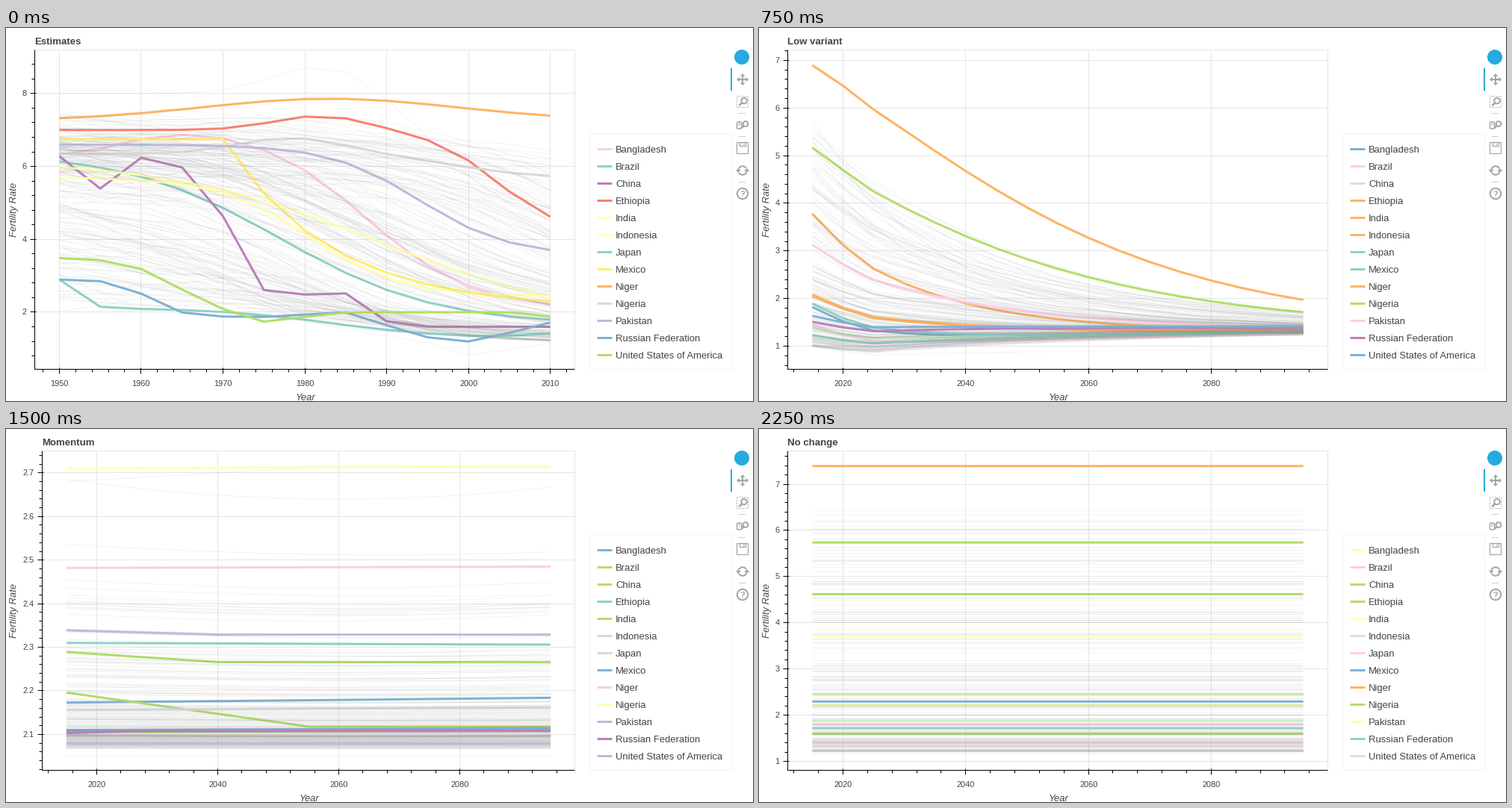
Write a matplotlib script that moves like this. It is 1000 by 500 pixels and loops after 2500 ms.

```python
import numpy as np
import matplotlib.pyplot as plt
from matplotlib.animation import FuncAnimation
from matplotlib.patches import Arc, Circle, FancyBboxPatch, Polygon, Rectangle

PX = 0.72  # points per pixel at 100 dpi
RIGHT, TOP, BOTTOM = 761, 29, 457
INK, GRID, ICON, ACTIVE = "#444444", "#e5e5e5", "#a1a6a9", "#26aae1"
PAST = np.arange(1950, 2011, 5)
FUTURE = np.arange(2015, 2096, 5)
AGE = FUTURE - 2015

PALETTE = dict(t="#8dd3c7", y="#ffffb3", l="#bebada", r="#fb8072",
               b="#80b1d3", o="#fdb462", g="#b3de69", p="#fccde5",
               s="#d9d9d9", v="#bc80bd", m="#ccebc5", d="#ffed6f")

# lowest and highest value per data set; the axes add 5 % on both sides
EXTENT = dict(past=(0.832, 8.797), medium=(1.235, 7.161), high=(1.485, 7.411),
              low=(0.819, 6.914), fixed=(1.12, 7.405),
              instant=(2.0357, 2.6172), momentum=(2.051, 2.717))

# title, data set, one palette letter per country
SCENES = [
    ("Estimates", "past", "ptvryytdoslbg"),
    ("Medium variant", "medium", "lvblmytbydpmm"),
    ("High variant", "high", "gtobpldytrbsm"),
    ("Low variant", "low", "bpmooottogpvb"),
    ("Constant-fertility", "fixed", "tlbpgyosrbmvd"),
    ("Instant-replacement", "instant", "ydbrlmglpytov"),
    ("Momentum", "momentum", "bggtgssbpylvl"),
    ("Zero-migration", "medium", "psgbpdmbgmsrp"),
    ("Constant-mortality", "medium", "mbytpoglvbdsr"),
    ("No change", "fixed", "ypggympbogytm"),
]


def fall(high, low, mid, width):
    """Logistic drop from one level to another."""
    return low + (high - low) / (1 + np.exp((PAST - mid) / width))


def decay(high, low, since, tau):
    return low + (high - low) * np.exp(-np.maximum(PAST - since, 0) / tau)


def bump(size, year, width):
    return size * np.exp(-((PAST - year) / width) ** 2)


def settle(start, floor, tau):
    """Decay towards a floor; floors under 1.8 slowly recover to it."""
    goal = floor + np.maximum(1.8 - floor, 0) * AGE / 80
    shape = 1 + 0.105 * np.maximum(start - 4, 0)
    return goal + (start - goal) * np.exp(-(AGE / tau) ** shape)


def drift(start, end, until=2095):
    return np.interp(FUTURE, [2015, until], [start, end])


def variants(past, medium, instant, momentum):
    shift = 0.25 + 0.25 * np.minimum(AGE / 10, 1) ** 0.75
    return dict(past=past, medium=medium, high=medium + shift,
                low=medium - shift, instant=instant, momentum=momentum,
                fixed=np.full(len(FUTURE), past[-1]))


COUNTRIES = {
    "Bangladesh": variants(
        fall(7.1, 2.07, 1987.5, 6.5) + bump(-0.75, 1950, 10),
        settle(2.07, 1.62, 12), settle(2.144, 2.075, 25), drift(2.173, 2.184)),
    "Brazil": variants(
        fall(6.4, 1.65, 1977, 9.5),
        settle(1.70, 1.50, 12), settle(2.098, 2.06, 50), drift(2.105, 2.11)),
    "China": variants(
        fall(6.3, 1.6, 1971.5, 2.5) + bump(1.05, 1983, 5) + bump(-0.9, 1955, 2.5),
        settle(1.64, 1.68, 15), settle(2.19, 2.06, 40), drift(2.196, 2.118, 2055)),
    "Ethiopia": variants(
        fall(7.0, 4.15, 2003.5, 4) + bump(0.4, 1982, 8),
        settle(4.03, 1.76, 19.5), settle(2.25, 2.07, 18), drift(2.31, 2.306)),
    "India": variants(
        fall(6.2, 1.68, 1989, 13),
        settle(2.30, 1.77, 20), settle(2.259, 2.095, 25), drift(2.289, 2.266, 2040)),
    "Indonesia": variants(
        fall(5.7, 2.44, 1980.5, 5.5),
        settle(2.33, 1.82, 18), settle(2.141, 2.075, 30), drift(2.156, 2.162)),
    "Japan": variants(
        fall(2.12, 1.29, 1983, 7) + bump(0.85, 1949, 3.5) + bump(0.12, 2011, 5),
        settle(1.48, 1.65, 18), settle(2.071, 2.05, 60), drift(2.075, 2.075)),
    "Mexico": variants(
        decay(6.75, 2.08, 1970, 13),
        settle(2.14, 1.65, 13), settle(2.103, 2.06, 40), drift(2.11, 2.114)),
    "Niger": variants(
        7.26 + bump(0.6, 1983, 22),
        settle(7.15, 1.90, 44), settle(2.416, 2.08, 26.5), drift(2.482, 2.485)),
    "Nigeria": variants(
        fall(6.35, 5.67, 1999, 5) + bump(0.45, 1978.5, 9),
        settle(5.42, 1.85, 39), settle(2.617, 2.08, 25), drift(2.71, 2.716)),
    "Pakistan": variants(
        fall(6.6, 3.55, 1994, 5.5),
        settle(3.38, 1.75, 28), settle(2.314, 2.07, 44), drift(2.339, 2.329, 2040)),
    "Russian Federation": variants(
        fall(2.9, 1.87, 1961, 2) + bump(0.2, 1984, 4) + bump(-0.68, 1999, 9),
        settle(1.76, 1.89, 18), settle(2.097, 2.06, 60), drift(2.103, 2.109, 2030)),
    "United States of America": variants(
        fall(3.5, 2.0, 1964, 3) + bump(-0.3, 1975.5, 5) + bump(-0.13, 2011, 3),
        settle(1.89, 1.92, 30), settle(2.075, 2.04, 90), drift(2.079, 2.079)),
}


def make_others(n=220):
    """The faint remaining countries, drawn at random from the same rules."""
    rng = np.random.default_rng(7)
    col = lambda lo, hi: rng.uniform(lo, hi, (n, 1))
    u = col(0, 1)
    last = 1.2 + 0.9 * u + 4.4 * u ** 3.2
    floor = np.where(u < 0.35, last * 0.93, np.minimum(2.2, last * 0.82))
    start = np.where(u < 0.35, col(2.2, 6), rng.normal(6.6, 0.55, (n, 1)))
    start = np.clip(np.maximum(start, last + 0.3), 1.8, 7.9)
    width = col(8, 13)
    mid = 2010 - width * np.log((start - last) / (last - floor))
    wave = np.sin(2 * np.pi * PAST / col(20, 45) + col(0, 6))
    past = (fall(start, floor, mid, width)
            + wave * rng.normal(0, 0.17, (n, 1)) * (2010 - PAST) / 60)
    past = np.clip(past, 0.95, 8.3)

    first = last - 0.09 * (last - 1.6)
    goal = 1.8 + 0.035 * (first - 1.8) + rng.normal(0, 0.05, (n, 1))
    medium = settle(first, goal, col(16, 40))
    instant = settle(2.062 + 0.025 * col(0, 1) + 0.5 * u ** 3 * col(0.3, 1),
                     2.05 + 0.02 * col(0, 1) + 0.03 * u, col(25, 50))
    level = 2.066 + 0.045 * col(0, 1) + 0.5 * u ** 4 * col(0.3, 1)
    momentum = level - (level - 2.06) * 0.05 * np.sin(np.pi * AGE / col(80, 120))

    # outliers at the edges of the charts
    past[0] = fall(8, 4.2, 1998, 5) + bump(0.9, 1983, 9)
    past[1] = fall(5, 1.15, 1967, 8) + bump(-0.4, 2001, 5)
    medium[1] = 1.24 + 0.21 * np.sqrt(AGE / 80)
    instant[0] = settle(2.57, 2.07, 38)
    instant[1] = drift(2.048, 2.04)
    momentum[0] = 2.64 + 0.045 * (AGE / 45 - 1) ** 2
    momentum[1] = 2.051
    momentum[2] = drift(2.68, 2.712, 2055)
    return [variants(*rows) for rows in zip(past, medium, instant, momentum)]


others = make_others()
fig = plt.figure(figsize=(10, 5), dpi=100, facecolor="white")
ax = fig.add_axes([0, 0, 1, 1])


def line(x, y, color="black", width=1, z=300, **kw):
    ax.plot(x, y, color=color, lw=width * PX, zorder=z, snap=False,
            solid_capstyle="butt", solid_joinstyle="round", **kw)


def text(x, y, s, size=13, ha="left", va="baseline", color=INK, **kw):
    ax.text(x, y, s, fontsize=size * PX, family="Liberation Sans",
            ha=ha, va=va, color=color, zorder=400, **kw)


def outline(patch, width=2, color=ICON, style="-"):
    patch.set(fill=False, edgecolor=color, linewidth=width * PX,
              linestyle=style, zorder=400, snap=False)
    ax.add_patch(patch)


def fill(patch, color=ICON):
    patch.set(facecolor=color, edgecolor="none", zorder=400)
    ax.add_patch(patch)


def lens(x, y, r, tail):
    outline(Circle((x, y), r))
    d = r * 0.7
    line([x - d, x - d - tail], [y + d, y + d + tail], ICON, 2.6)


def draw_toolbar():
    fill(Circle((984.5, 38.5), 10), ACTIVE)
    line([970.5, 970.5], [53.5, 83.5], ACTIVE, 2)
    for y in (114, 145, 206):
        line([980, 990], [y, y], "#d0d0d0")

    # pan
    line([980, 992], [68.5, 68.5], ICON, 2)
    line([985.5, 985.5], [63, 75], ICON, 2)
    for dx, dy in ((1, 0), (-1, 0), (0, 1), (0, -1)):
        tip = [(985.5 + 8 * dx, 68.5 + 8 * dy)]
        base = [(985.5 + 4.5 * dx + k * dy, 68.5 + 4.5 * dy + k * dx)
                for k in (3.5, -3.5)]
        fill(Polygon(tip + base))

    # box zoom, wheel zoom
    outline(Rectangle((978, 91), 15, 15), 1, style=(0, (1.5, 1.5)))
    lens(987.5, 97, 3.8, 4)
    outline(FancyBboxPatch((979.5, 127), 3, 6, boxstyle="round,pad=1.5"), 1.5)
    line([981, 981], [127, 130], ICON, 1.2)
    lens(989.5, 128, 3.4, 3)

    # save
    outline(Rectangle((978, 153), 15, 15), 1.2)
    outline(Rectangle((982, 153), 8, 5), 1.2)
    line([987.5, 987.5], [154, 157], ICON, 1.2)

    # reset
    for start, side in ((190, -1), (10, 1)):
        outline(Arc((985.5, 190.5), 11.5, 11.5, theta1=start, theta2=start + 140))
        x, y = 985.5 + 5.8 * side, 190.5 + side
        fill(Polygon([(x - 3.5, y), (x + 3.5, y), (x, y - 4 * side)]))

    # help
    outline(Circle((985.5, 221.5), 7.2))
    text(985.5, 225.5, "?", 11, "center", color=ICON, weight="bold")


def draw_axes(title, left, sx, sy, years, lo, hi):
    xstep = 10 if years is PAST else 20
    ystep = 0.1 if hi - lo < 1 else 2 if years is PAST else 1
    pad = (years[-1] - years[0]) * 0.05

    for k in range(int(np.ceil((years[0] - pad) * 5 / xstep)),
                   int((years[-1] + pad) * 5 / xstep) + 1):
        x, major = round(sx(k * xstep / 5)), k % 5 == 0
        line([x, x], [455 if major else 457, 463 if major else 461])
        if major:
            line([x, x], [TOP, BOTTOM], GRID, z=-2)
            text(x, 479.5, str(k * xstep // 5), 11, "center")

    for k in range(int(np.ceil(lo * 5 / ystep)), int(hi * 5 / ystep) + 1):
        y, major = round(sy(k * ystep / 5)), k % 5 == 0
        line([left - (6 if major else 4), left + (2 if major else 0)], [y, y])
        if major:
            line([left, RIGHT], [y, y], GRID, z=-2)
            label = f"{k * ystep / 5:.1f}" if ystep < 1 else str(k * ystep // 5)
            text(left - 11, y + 3.5, label, 11, "right")

    line([left, RIGHT, RIGHT], [TOP, TOP, BOTTOM], GRID, z=-1)
    line([left, left], [TOP, BOTTOM + 0.5])
    line([left - 0.5, RIGHT], [BOTTOM, BOTTOM])
    text(left, 21.5, title, 13.25, weight="bold")
    text((left + RIGHT) / 2 + 1, 498.5, "Year", ha="center", style="italic")
    text(11, 243, "Fertility Rate", ha="center", va="center",
         style="italic", rotation=90)


def draw(i):
    title, key, letters = SCENES[i]
    years = PAST if key == "past" else FUTURE
    low, high = EXTENT[key]
    pad = 0.05 * (high - low)
    lo, hi = low - pad, high + pad
    left = 48 if hi - lo < 1 else 38
    span = years[-1] - years[0]

    def sx(year):
        return left + (year - years[0] + 0.05 * span) / (1.1 * span) * (RIGHT - left)

    def sy(v):
        return BOTTOM - (v - lo) / (hi - lo) * (BOTTOM - TOP)

    ax.clear()
    ax.set_axis_off()
    ax.set(xlim=(-0.5, 999.5), ylim=(499.5, -0.5))  # whole numbers hit pixel centres
    draw_axes(title, left, sx, sy, years, lo, hi)

    xs = sx(years)
    for z, data in enumerate(others):
        line(xs, sy(data[key]), "gray", 1, z, alpha=0.09)

    outline(Rectangle((781, 141), 190, 316), 1, "#f2f2f2")
    for row, ((name, data), c) in enumerate(zip(COUNTRIES.items(), letters)):
        y = 162 + 23 * row
        rank = 10 * (ord(name[0]) - ord("A") + 1)  # alphabetical stacking
        line(xs, sy(data[key]), PALETTE[c], 3, rank + 0.5)
        line([791, 811], [y, y], PALETTE[c], 3)
        text(815.5, y + 4.5, name)
    draw_toolbar()
    return []


anim = FuncAnimation(fig, draw, frames=len(SCENES), interval=250, repeat=True)
plt.show()
```
